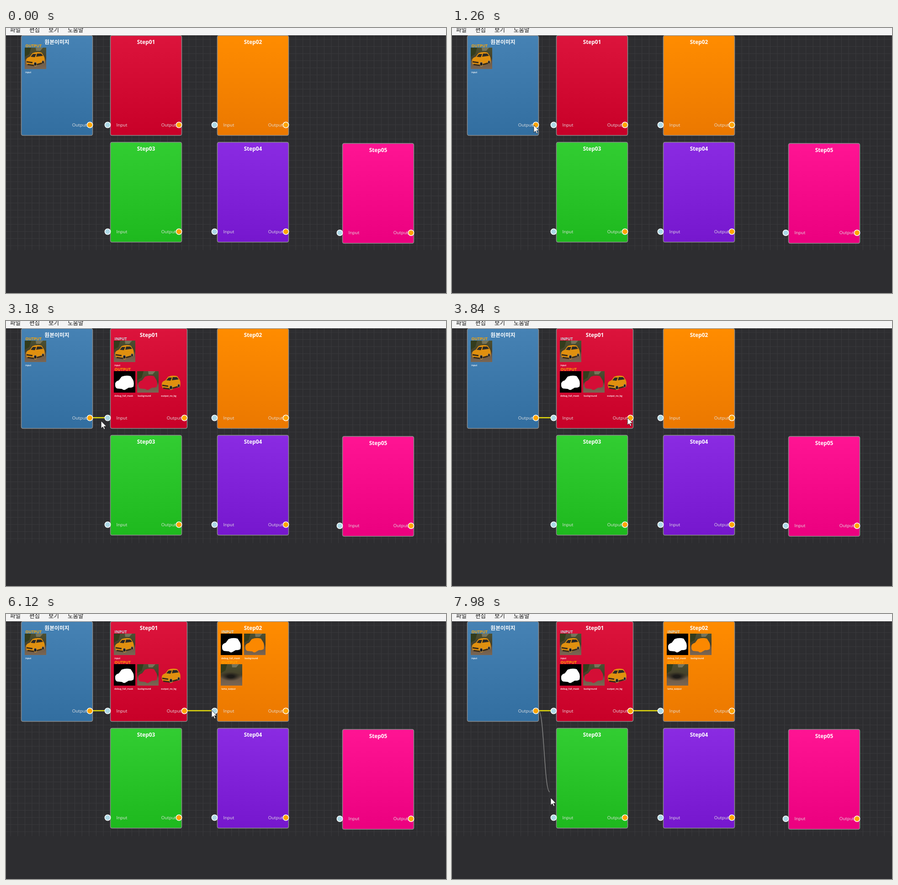
These frames come from a looping animation (963 by 581 pixels, 8 s). An HTML page:

```html
<!DOCTYPE html>
<html lang="ko">
<head>
<meta charset="utf-8">
<style>
html, body { margin: 0; width: 100%; height: 100%; overflow: hidden; background: #2d2d30; }
svg { display: block; width: 963px; height: 581px; }
text { font-family: "Open Sans", "Noto Sans CJK KR", "Noto Sans CJK", sans-serif; }
.menu { font-size: 12.5px; fill: #111; }
.title { font-size: 11.8px; font-weight: 700; fill: #fff; text-anchor: middle; }
.port { font-size: 9.7px; fill: #e4e4e4; }
.end { text-anchor: end; }
.group { font-size: 8.7px; font-weight: 700; }
.name { font-size: 5.1px; font-weight: 600; fill: #fff; }
</style>
</head>
<body>
<svg viewBox="0 0 963 581">
  <defs>
    <pattern id="grid" x="-6" y="-22.4" width="15.6" height="15.6" patternUnits="userSpaceOnUse">
      <path d="M0 .5H15.6M.5 0V15.6" stroke="#39393c"/>
    </pattern>
    <linearGradient id="land" x2="0" y2="1">
      <stop stop-color="#4c5032"/><stop offset=".5" stop-color="#45402a"/>
      <stop offset=".65" stop-color="#6c5a47"/><stop offset="1" stop-color="#7a6653"/>
    </linearGradient>
    <radialGradient id="smudge">
      <stop offset=".3" stop-color="#1d1b18"/><stop offset="1" stop-color="#2a2620" stop-opacity="0"/>
    </radialGradient>
    <g id="photo">
      <rect width="47" height="47" fill="url(#land)"/>
      <path fill="#333c1c" d="M0 0H14L10 14L0 20Z"/>
      <path fill="#77745a" d="M24 0H40L34 7H25Z"/>
    </g>
    <path id="blob" d="M3 27Q4 22 11 20L17 12Q27 8 37 11L42 19Q45 24 43 34Q38 37 33 36L26 40Q22 43 18 39L7 38Q3 36 3 31Z"/>
    <g id="car">
      <use href="#blob" fill="#e0900f"/>
      <path fill="#2c2a26" d="M13 20L18 14H25L22 21ZM25 20L27 13H36L40 18Z"/>
      <path fill="none" stroke="#3a2c18" stroke-width="3" d="M4 31L17 33M6 37L20 39L42 33"/>
      <g fill="#1c1a18" stroke="#8a8378">
        <ellipse cx="23" cy="36" rx="3" ry="4"/><ellipse cx="40" cy="32" rx="2.3" ry="3.5"/>
      </g>
    </g>
  </defs>
  <rect y="16" width="963" height="471" fill="url(#grid)"/>
  <g id="wires" fill="none"></g>
  <g id="scene"></g>
  <rect width="963" height="16" fill="#f4f4f4"/>
  <g class="menu">
    <text x="9" y="8.7">파일</text><text x="51" y="8.7">편집</text>
    <text x="93" y="8.7">보기</text><text x="135" y="8.7">도움말</text>
  </g>
  <path id="cursor" fill="#fff" stroke="#111" stroke-width=".8"
    d="M0 0V16.2L3.7 12.8L6.3 18.4L8.7 17.4L6.2 11.9H11.5Z"/>
</svg>
<script>
const $ = id => document.getElementById(id);
const use = (id, color = '') => `<use href="#${id}" fill="${color}"/>`;
const darker = hex => `rgb(${hex.match(/\w\w/g).map(h => Math.max(0, parseInt(h, 16) - 20))})`;

const art = {
  input: () => use('photo') + use('car'),
  debug_full_mask: () => '<rect width="47" height="47"/>' + use('blob', '#fff'),
  background: color => use('photo') + use('blob', color),
  output_no_bg: () => use('car'),
  lama_output: () => use('photo') + '<ellipse cx="22" cy="27" rx="23" ry="10" fill="url(#smudge)"/>'
};

// A labelled row of thumbnails, placed relative to its card
function row(y, kind, names, color) {
  const tint = kind === 'INPUT' ? '#c5dce4' : '#ffa500';
  return `<text class="group" x="9" y="${y - 1.5}" fill="${tint}">${kind}</text>` +
    names.map((name, i) => `<g transform="translate(${7.5 + i * 51} ${y})">${art[name](color)}
      <text class="name" x="1.3" y="56">${name}</text></g>`).join('');
}
const upper = (...args) => row(26.5, ...args);
const lower = (...args) => row(93.5, ...args);

const port = (x, color) =>
  `<circle cx="${x}" cy="196" r="6.2" fill="${color}" stroke="#fff" stroke-width="1.5"/>`;

function card(title, x, y, color, rows = '', w = 156) {
  const id = 'shade' + color.slice(1);
  const input = title.startsWith('Step')
    ? '<text class="port" x="13" y="199">Input</text>' + port(-6, '#add8e6') : '';
  return `<g transform="translate(${x} ${y})">
    <linearGradient id="${id}" x2="0" y2="1">
      <stop stop-color="${color}"/><stop offset="1" stop-color="${darker(color)}"/>
    </linearGradient>
    <rect width="${w}" height="219" rx="3.5" fill="url(#${id})" stroke="#8c8c8c" stroke-width="1.5"/>
    <text class="title" x="${w / 2}" y="18.5">${title}</text>${rows}
    <text class="port end" x="${w - 12.5}" y="199">Output</text>
    ${port(w - 6, '#ffa500')}${input}</g>`;
}

function scene(stage) {
  const first = stage < 1 ? '' : upper('INPUT', ['input']) +
    lower('OUTPUT', ['debug_full_mask', 'background', 'output_no_bg'], '#d40e36');
  const second = stage < 2 ? '' : upper('INPUT', ['debug_full_mask', 'background'], '#fb8800') +
    lower('OUTPUT', ['lama_output']);
  return card('원본이미지', 33.5, 16.5, '#4682b4', upper('OUTPUT', ['input'])) +
    card('Step01', 228.5, 16.5, '#dc143c', first, stage ? 168 : 156) +
    card('Step02', 462.5, 16.5, '#ff8c00', second) +
    card('Step03', 228.5, 250.5, '#32cd32') +
    card('Step04', 462.5, 250.5, '#8a2be2') +
    card('Step05', 736.5, 253, '#ff1493');
}

// Pointer moves: begin, end, destination; it rests in between
const moves = [
  [60, 480, 69, 205], [480, 900, 179, 213], [1380, 1500, 181, 212],
  [1620, 2400, 218, 211], [3120, 3300, 194, 231], [3300, 3840, 384, 212],
  [3900, 4140, 390, 211], [4380, 5100, 450, 211], [6360, 6720, 270, 313],
  [6720, 6960, 187, 239], [6960, 7080, 183, 208], [7500, 7980, 216, 403]
];

function pointer(t) {
  let x = 778, y = 157;
  for (const [begin, end, toX, toY] of moves) {
    const p = Math.min(1, Math.max(0, (t - begin) / (end - begin)));
    const ease = 1 - (1 - p) ** 1.3;
    x += (toX - x) * ease;
    y += (toY - y) * ease;
  }
  return [x, y];
}

// A wire follows the pointer from begin and locks onto a port at link
const wires = [
  { begin: 1680, link: 2880, from: 189.5, to: 216 },
  { begin: 4440, link: 6120, from: 396.5, to: 450 },
  { begin: 7560, link: Infinity, from: 189.5 }
];

function wire({ begin, link, from, to }, t) {
  if (t < begin) return '';
  const linked = t >= link;
  const [x, y] = linked ? [to, 212] : pointer(t - 60); // trails by one step
  const mid = (from + x) / 2;
  return `<path d="M${from} 212C${mid} 212 ${mid} ${y} ${x} ${y}"
    stroke="${linked ? '#e6de0c' : '#858585'}" stroke-width="${linked ? 2.5 : 1.5}"/>`;
}

let stage = -1;
function draw(now) {
  const t = Math.floor(now % 8000 / 60) * 60;
  const next = wires.filter(w => t >= w.link).length;
  if (next !== stage) $('scene').innerHTML = scene(stage = next);
  $('wires').innerHTML = wires.map(w => wire(w, t)).join('');
  $('cursor').setAttribute('transform', `translate(${pointer(t)})`);
  $('cursor').setAttribute('visibility', t < 60 ? 'hidden' : 'visible');
}

const start = performance.now();
function loop() {
  draw(performance.now() - start);
  requestAnimationFrame(loop);
}
loop();
</script>
</body>
</html>
```
